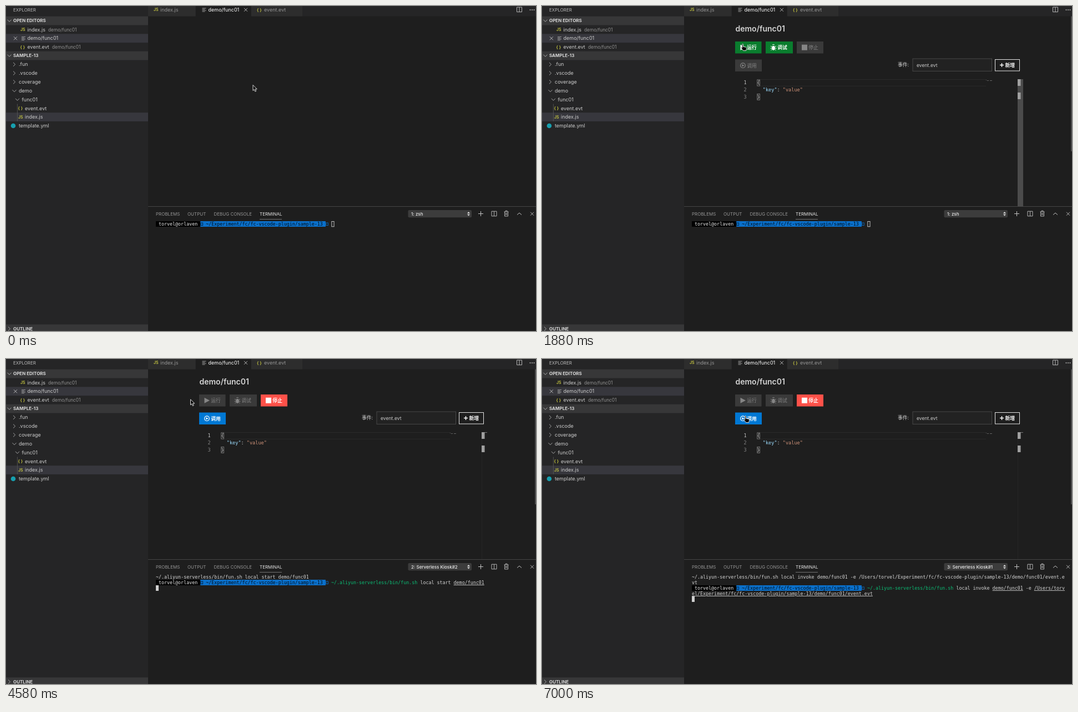
An HTML page for the animation above (8000 ms loop, 955x586 px).

```html
<!DOCTYPE html>
<html lang="en">
<head>
<meta charset="utf-8">
<title>Editor session</title>
<style>
  html, body { margin: 0; width: 100%; height: 100%; overflow: hidden; background: #1e1e1e; }
  svg { display: block; width: 955px; height: 586px; }
  text { white-space: pre; font-family: Inter, "Noto Sans CJK SC", "Noto Sans CJK", sans-serif; }
  .mono { font-family: "DejaVu Sans Mono", monospace; }
  .line { fill: none; stroke: currentColor; }
</style>
</head>
<body>
<svg id="stage" viewBox="0 0 955 586"></svg>
<script>
const LOOP = 8000;
const END = LOOP;
const USER = 'torvel', HOST = 'orlaven', SERVICE = 'Serverless Kiosk';

// Drawing helpers
const rect = (x, y, w, h, fill, extra = '') =>
  `<rect x="${x}" y="${y}" width="${w}" height="${h}" fill="${fill}" ${extra}/>`;
const frame = (x, y, w, h, color, width = 1) =>
  rect(x, y, w, h, 'none', `stroke="${color}" stroke-width="${width}"`);
const text = (x, y, content, fill = '#ccc', size = 9, extra = '') =>
  `<text x="${x}" y="${y}" fill="${fill}" font-size="${size}" ${extra}>${content}</text>`;
const line = (d, color = '#c5c5c5', width = 1) =>
  `<path class="line" d="${d}" color="${color}" stroke-width="${width}"/>`;
const at = (x, y, content) => `<g transform="translate(${x} ${y})">${content}</g>`;
const during = (from, to, content) => `<g data-from="${from}" data-to="${to}">${content}</g>`;

const bold = 'font-weight="700"';
const jsIcon = (x, y) => text(x, y + 2.6, 'JS', '#cbcb41', 7, 'font-weight="600"');
const braces = (x, y) => text(x, y + 2.8, '{ }', '#cbcb41', 7.5, 'font-weight="600"');
const listIcon = (x, y) => line(`M${x} ${y - 3}h7m-7 2h5m-5 2h7m-7 2h5`, '#b5b5b5', .8);
const closeIcon = (x, y) => line(`M${x - 3} ${y - 3}l6 6m0-6l-6 6`, '#c5c5c5', .9);
const right = (x, y) => line(`M${x - 2} ${y - 3.5}l3.6 3.5l-3.6 3.5`, '#c5c5c5', .8);
const down = (x, y) => line(`M${x - 3.5} ${y - 1.8}l3.5 3.6l3.5-3.6`, '#c5c5c5', .8);
const splitIcon = (x, y) => line(`M${x - 4.5} ${y - 4.3}h9v8.6h-9zm4.5 0v8.6`, '#c5c5c5', .9);

function sidebar() {
  const header = (y, label, chevron) =>
    rect(0, y - 7.8, 256, 15.8, '#373738') + chevron(6, y) + text(13, y + 2.9, label, '#d8d8d8', 8, bold);
  const label = (x, y, name) => text(x, y + 3.1, name);
  const detail = (x, y) => text(x, y + 3.1, 'demo/func01', '#929292', 8.3);
  const folders = ['.fun', '.vscode', 'coverage'].map((name, i) => {
    const y = 105.3 + i * 15.8;
    return right(15, y) + label(23, y, name);
  }).join('');
  return rect(0, 0, 256, 586, '#252526') + text(13, 9.5, 'EXPLORER', '#bbb', 8)
    + header(26.5, 'OPEN EDITORS', down)
    + jsIcon(26, 42.5) + label(38.5, 42.5, 'index.js') + detail(76, 42.5)
    + rect(0, 50.3, 256, 15.8, '#37373d') + closeIcon(17, 58.3) + listIcon(28, 58.6) + label(38.5, 58.3, 'demo/func01')
    + braces(25.5, 74) + label(38.5, 74, 'event.evt') + detail(83, 74)
    + header(89.5, 'SAMPLE-13', down) + folders
    + down(15, 153) + label(23, 153, 'demo')
    + down(20.5, 168.6) + label(28.5, 168.6, 'func01')
    + rect(0, 192.2, 256, 15.8, '#37373d') + rect(20, 176.5, .8, 31.5, '#585858')
    + braces(21.5, 184.4) + label(34, 184.4, 'event.evt')
    + jsIcon(22, 200.2) + label(34, 200.2, 'index.js')
    + '<circle cx="13" cy="216" r="4.3" fill="#179fae"/>' + label(23, 216, 'template.yml')
    + header(582, 'OUTLINE', right);
}

function tabs() {
  return rect(256, 0, 699, 18.5, '#252526')
    + rect(256, 0, 85.5, 18.5, '#2d2d2d') + jsIcon(266, 6.8) + text(278, 10, 'index.js', '#969696')
    + rect(342, 0, 99.5, 18.5, '#1e1e1e') + listIcon(353.5, 7) + text(364.5, 10, 'demo/func01', '#fff') + closeIcon(432, 6.8)
    + rect(442, 0, 92, 18.5, '#2d2d2d') + braces(452, 6.8) + text(465, 10, 'event.evt', '#969696')
    + splitIcon(925, 6.4)
    + [944.5, 948, 951.5].map(x => `<circle cx="${x}" cy="7" r=".9" fill="#c5c5c5"/>`).join('');
}

// Action buttons; icons are drawn around their own centre
const icons = {
  run: '<path d="M-4.5-5L5 0L-4.5 5z" fill="currentColor"/>',
  stop: rect(-5, -5, 10, 10, 'currentColor'),
  debug: '<ellipse cy="1" rx="2.8" ry="4" fill="currentColor"/><path class="line" d="M-2-4.5q2-2 4 0M-5-2.5l2.5 1.5m-3 2.5h3m-2 3.5l2-1.5M5-2.5L2.5-1m3 2.5h-3m2 3.5l-2-1.5"/>',
  invoke: '<circle class="line" r="4.3" stroke-width="1.2"/><path d="M-1.5-2.3L2.5 0L-1.5 2.3z" fill="currentColor"/>'
};
function button(x, y, width, icon, label, fill) {
  const color = fill ? '#fff' : '#858585';
  return rect(x, y, width, 21.5, fill || '#3a3a3a')
    + `<g color="${color}">${at(x + 14, y + 10.7, icons[icon])}</g>`
    + text(x + 21.3, y + 14, label, color, 8.8, fill ? bold : 'font-weight="500"');
}
function buttons(running) {
  const green = running ? null : '#0a7d2e';
  return button(348, 64, 47.5, 'run', '运行', green)
    + button(403, 64, 49, 'debug', '调试', green)
    + button(459, 64, 48, 'stop', '停止', running && '#ff5149')
    + button(348, 96.5, 48, 'invoke', '调用', running && '#0078d4');
}

function functionPage() {
  const mono = (x, row, content, fill) => text(x, 141.2 + row * 12.8, content, fill, 8.55, 'class="mono"');
  const lineNumbers = [1, 2, 3].map(n => mono(363.5, n - 1, n, n === 1 ? '#c6c6c6' : '#858585')).join('');
  const span = (fill, content) => `<tspan fill="${fill}">${content}</tspan>`;
  const entry = (key, value) => mono(387.5, 1, `  ${span(key, '"key"')}: ${span(value, '"value"')}`, '#d4d4d4');
  const marks = rect(857, 132, 5.5, 12, '#a0a0a0') + rect(857, 156, 5.5, 12, '#a0a0a0');
  return during(270, END,
      text(348.5, 46, 'demo/func01', '#d4d4d4', 14, 'font-weight="600"')
      + text(641, 108.5, '事件:', '#d4d4d4', 8.8)
      + rect(668, 95, 142.5, 22.5, '#222', 'stroke="#474747"')
      + frame(816.5, 96.5, 44, 20.5, '#e4e4e4')
      + line('M825 106.5h7m-3.5-3.5v7', '#fff', 1.5) + text(834.5, 109.8, '新增', '#fff', 8.8, bold)
      + rect(953, 18.5, 2, 243.5, '#4c4c4c'))
    + during(270, 2420, buttons(false)) + during(2420, END, buttons(true))
    + during(540, 810, entry('#d4d4d4', '#d4d4d4'))
    + during(810, 2150, rect(857, 132, 10, 229, '#4b4b4b'))
    + during(2150, END, rect(857, 132, .8, 229, '#292929') + rect(857, 132, 10, 1, '#777'))
    + during(810, END,
      line('M387 132.5h413M387 144.3h413', '#2b2b2b')
      + frame(387.8, 133, 4.8, 11, '#888', .8) + frame(387.8, 158.5, 4.8, 11, '#888', .8)
      + entry('#9cdcfe', '#ce9178'))
    + during(540, END,
      text(675, 109.5, 'event.evt', '#ccc', 8.6) + lineNumbers
      + mono(387.5, 0, '{', '#d4d4d4') + mono(387.5, 2, '}', '#d4d4d4')
      + line('M800 133.5h1m1 1h3m2 0h4', '#777', .8) + marks);
}

function panelHeader() {
  const tab = (x, label, fill = '#969696') => text(x, 377.7, label, fill, 8);
  const picked = label => text(730, 377.6, label, '#f0f0f0', 8, 'font-weight="500"');
  return rect(256, 361, 699, 225, '#1e1e1e') + rect(256, 361, 699, .9, '#4a4a4a')
    + tab(270, 'PROBLEMS') + tab(327, 'OUTPUT') + tab(374.5, 'DEBUG CONSOLE') + tab(457, 'TERMINAL', '#e7e7e7')
    + rect(457, 384, 40, .8, '#8a8a8a')
    + rect(724.5, 368, 114.5, 13.3, '#3c3c3c', 'rx="2"')
    + '<path d="M831 374l2.5-3l2.5 3zm0 1.6l2.5 3l2.5-3z" fill="#ddd"/>'
    + during(0, 2420, picked('1: zsh'))
    + during(2420, 6190, picked(`2: ${SERVICE}#2`))
    + during(6190, END, picked(`3: ${SERVICE}#1`))
    + line('M851 374.5h9m-4.5-4.5v9') + splitIcon(879.5, 374.5)
    + line('M897.5 371h8m-5.5-.5v-1.3h3v1.3m-4.5 .5v8h6v-8m-4 2v4m2-4v4', '#c5c5c5', .9)
    + line('M921 376.5l4-3.5l4 3.5') + closeIcon(948, 374.7);
}

// Terminal cells
const CELL = 5.015, ROW = 10;
const cellX = col => 270 + col * CELL;
const cellY = row => 388 + row * ROW;
const put = (row, col, content, fill = '#d4d4d4', underline = false) =>
  text(cellX(col), cellY(row) + 8, content, fill, 8.33, `class="mono" ${underline ? 'text-decoration="underline"' : ''}`);
const block = row => rect(270, cellY(row), CELL, ROW, '#d0d0d0');

function prompt(row) {
  const y = cellY(row);
  const box = (col, color) => frame(cellX(col) + .8, y + 3, 3.6, 4.6, color, .8);
  return rect(270, y, 16 * CELL, ROW, '#000') + put(row, 1, `${USER}@${HOST}`, '#e8e8e8')
    + rect(cellX(16), y, 45 * CELL, ROW, '#0a70cb') + box(16, '#001a33')
    + put(row, 18, '~/Experiment/fc/fc-vscode-plugin/sample-13', '#00101f') + box(61, '#0a70cb');
}

function terminal() {
  const columns = 134;
  const script = '~/.aliyun-serverless/bin/fun.sh';
  const eventPath = `/Users/${USER}/Experiment/fc/fc-vscode-plugin/sample-13/demo/func01/event.evt`;
  const invoke = `${script} local invoke demo/func01 -e ${eventPath}`;
  const typed = (row, verb) => {
    const argument = 63 + `${script} local ${verb} `.length;
    return prompt(row) + put(row, 63, script, '#0bbb74')
      + put(row, 63 + script.length, ` local ${verb}`) + put(row, argument, 'demo/func01', undefined, true);
  };
  const pathCol = 63 + `${script} local invoke demo/func01 -e `.length;
  const fits = columns - pathCol;
  return during(0, 2420, prompt(0) + frame(cellX(63) + .9, 388.5, 4.2, 9.3, '#d0d0d0', .9))
    + during(2420, 2960, block(0))
    + during(2960, 6190, put(0, 0, `${script} local start demo/func01`))
    + during(2960, 3230, block(1))
    + during(3230, 6190, typed(1, 'start'))
    + during(3230, 4840, block(2))
    + during(4840, 6190,
      put(2, 0, 'using template: template.yml')
      + put(3, 0, `${SERVICE.toLowerCase()} app listening locally on port 8000!`) + block(4))
    + during(6190, 6730, block(0))
    + during(6730, END, put(0, 0, invoke.slice(0, columns)) + put(1, 0, invoke.slice(columns)))
    + during(6730, 7000, block(2))
    + during(7000, END,
      typed(2, 'invoke') + put(2, pathCol - 3, '-e')
      + put(2, pathCol, eventPath.slice(0, fits), undefined, true)
      + put(3, 0, eventPath.slice(fits), undefined, true) + block(4));
}

function pointer() {
  const outlined = d => `<path d="${d}" fill="#080808" stroke="#f4f4f4" stroke-width=".9" stroke-linejoin="round"/>`;
  const arrow = outlined('M.5.5v10l2.3-2.1l1.6 3.8l1.8-.8l-1.6-3.6h3.1z');
  const hand = outlined('M2.7 1.6c0-1.5 2-1.5 2 0v3.6l4.5 1c1.1.3 1.5 1 1.3 2.1l-.8 4.2H4.6L1 8C.2 6.8 1.4 6 2.3 6.8l.4.4z');
  const beam = line('M0 .5q2.5 0 2.5 1.5v8q0 1.5-2.5 1.5M5 .5q-2.5 0-2.5 1.5v8q0 1.5 2.5 1.5', '#e8e8e8', .9);
  const forbidden = arrow + at(7.3, 15.7, '<circle r="4.9" fill="#222" stroke="#f4f4f4" stroke-width="1.7"/>'
    + line('M-3.3-3.3l6.6 6.6', '#f4f4f4', 1.6));
  const steps = [
    [0, 444.5, 142, arrow], [1350, 441, 138, beam], [1620, 398, 114, arrow],
    [1880, 358, 68, hand], [2150, 358, 67, hand], [2420, 361, 66, forbidden],
    [2690, 332, 72.3, arrow], [5380, 361.3, 94.5, arrow], [5650, 363, 102, hand]
  ];
  return steps.map(([from, x, y, shape], i) =>
    during(from, steps[i + 1]?.[0] ?? END, at(x, y, shape))).join('');
}

const stage = document.getElementById('stage');
stage.innerHTML = rect(0, 0, 955, 586, '#1e1e1e') + sidebar() + tabs()
  + panelHeader() + functionPage() + terminal() + pointer();
const timed = [...stage.querySelectorAll('[data-from]')];

function tick() {
  const now = performance.now() % LOOP;
  for (const group of timed) {
    const { from, to } = group.dataset;
    group.style.display = now >= +from && now < +to ? '' : 'none';
  }
  requestAnimationFrame(tick);
}
tick();
</script>
</body>
</html>
```
